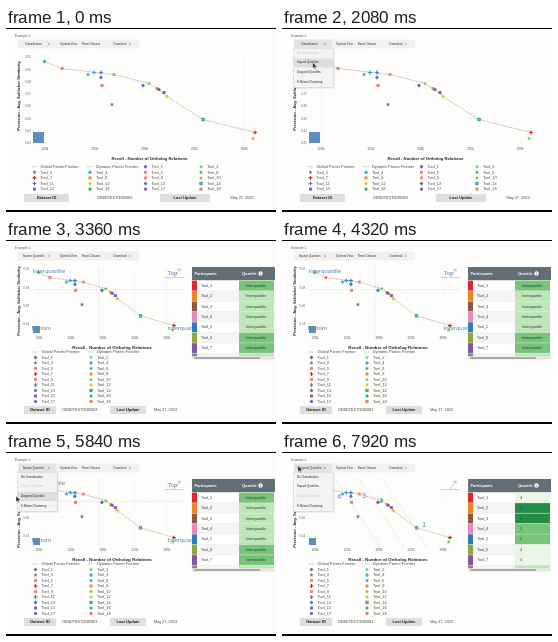
An HTML page that plays this animation: 270 by 184 pixels, repeating every 8 s.

```html
<!DOCTYPE html>
<html lang="en">
<head>
<meta charset="utf-8">
<title>Benchmark chart</title>
<style>
  html, body { margin: 0; width: 100%; height: 100%; overflow: hidden; background: #fdfdfb; }
  svg { display: block; width: 270px; height: 184px; }
  text { font-family: "Liberation Sans", Arial, sans-serif; white-space: pre; }
</style>
</head>
<body>
<svg id="stage" viewBox="0 0 270 184"></svg>
<script>
const stage = document.getElementById('stage');
const LOOP = 8000;
const MODES = ['Classification', 'Square Quartiles', 'Diagonal Quartiles'];
const ITEMS = ['No Classification', 'Square Quartiles', 'Diagonal Quartiles', 'K-Means Clustering'];

// x, y in the wide plot, shape, colour; one entry per tool
const TOOLS = [
  [137, 58, 'diamond', '#6a5acd'], [247, 111, 'star', '#6fce62'],
  [106, 77, 'star', '#84706a'], [88, 45, 'plus', '#2a9fd0'],
  [56, 41, 'square', '#ee7f86'], [82, 47, 'star', '#3aa6a0'],
  [249, 105, 'plus', '#d3222a'], [151, 61, 'square', '#f08a3c'],
  [108, 47, 'square', '#ef8a78'], [143, 56, 'star', '#67c95a'],
  [95, 45, 'plus', '#3f7fc4'], [161, 69, 'diamond', '#e8c520'],
  [95, 50, 'diamond', '#5a6fc0'], [197, 92, 'cross', '#279a83'],
  [158, 65, 'square', '#8e5bb5'], [38.5, 34, 'diamond', '#35b08a'],
  [153, 62, 'dot', '#6e57a8'], [96, 58, 'square', '#ee7a5c']
];
const FRONT = [[38.5, 34], [56, 41], [108, 47], [143, 56], [151, 61], [161, 69], [197, 92], [249, 105]];
const BARS = ['#e0252d', '#f08327', '#8a5a44', '#ee86bd', '#3579b8', '#91a63a', '#8455a5', '#858585'];
const GREENS = ['#248d47', '#76c578', '#bfe6b8', '#eaf6e6'];
const SQUARE_RANKS = [2, 3, 3, 3, 3, 2, 2, 3];
const DIAGONAL_RANKS = [4, 1, 1, 2, 2, 4, 4, 3];

const rect = (x, y, w, h, fill, more = '') =>
  `<rect x="${x}" y="${y}" width="${w}" height="${h}" fill="${fill}" ${more}/>`;
const text = (x, y, s, size = 3.8, fill = '#444', more = '') =>
  `<text x="${x}" y="${y}" font-size="${size}" fill="${fill}" ${more}>${s}</text>`;
const path = (d, stroke, width = .6, more = '') =>
  `<path d="${d}" fill="none" stroke="${stroke}" stroke-width="${width}" ${more}/>`;
const MID = 'text-anchor="middle"';
const BOLD = 'font-weight="700"';

function starPath() {
  let d = '';
  for (let i = 0; i < 10; i++) {
    const a = i * Math.PI / 5 - Math.PI / 2, r = i % 2 ? 1.1 : 2.6;
    d += `${i ? 'L' : 'M'}${(r * Math.cos(a)).toFixed(2)} ${(r * Math.sin(a)).toFixed(2)}`;
  }
  return d + 'z';
}

const SHAPES = {
  square: c => rect(-1.7, -1.7, 3.4, 3.4, c),
  dot: c => `<circle r="1.8" fill="${c}"/>`,
  diamond: c => `<path d="M0-2.4L2.2 0L0 2.4L-2.2 0z" fill="${c}"/>`,
  plus: c => path('M-2.2 0h4.4M0-2.2v4.4', c, 1.4),
  cross: c => rect(-1.9, -1.9, 3.8, 3.8, c) + path('M-1.2-1.2l2.4 2.4m0-2.4l-2.4 2.4', '#bfe5d8'),
  star: c => `<path d="${starPath()}" fill="${c}"/>`
};
const marker = (x, y, shape, color) =>
  `<g transform="translate(${x} ${y}) scale(.87)">${SHAPES[shape](color)}</g>`;

function toolbar(mode, open) {
  const label = (x, s) => text(x, 17.1, s, 2.9, '#333', MID);
  return text(9, 9, 'Example 1:', 3.2, '#555') +
    rect(12, 11.5, 121, 9, '#f1f1f0') + (open ? rect(12, 11.5, 38, 9, '#e4e4e3') : '') +
    label(27.5, MODES[mode]) + path('M42 14.6l1.4 1.4l-1.4 1.4', '#444', .5) +
    label(62.5, 'Optimal View') + label(85, 'Reset Classes') + label(114, 'Download') +
    path('M123 14.6l1.4 1.4l-1.4 1.4', '#444', .5);
}

function chart(mode, shown) {
  const wide = mode === 0;
  const px = x => wide ? x : .643 * x + 7.8;
  const py = y => wide ? y - .5 : .75 * y + 6.8;
  const left = px(27), right = px(263), top = py(27), bottom = py(117);
  let s = '';
  for (let i = 0; i < 5; i++) {
    const x = px(39 + 49.8 * i);
    s += path(`M${x} ${top}V${bottom}`, '#f5f5f3') +
      text(x, bottom + (wide ? 5 : 4.2), 100 + 50 * i + 'k', 3.2, '#555', MID);
  }
  const rows = wide ? 8 : 4, step = wide ? 12.3 : 24.6;
  for (let i = 0; i < rows; i++) {
    const y = py(29.5 + step * i);
    s += path(`M${left} ${y}H${right}`, '#f5f5f3') +
      text(left - 2, y + 1.2, (.5 - .04 * i / rows * 2).toFixed(2), 3.1, '#666', 'text-anchor="end"');
  }
  const logo = wide ? 11 : 7;
  s += text(0, 0, 'Precision - Avg. Schlicker Similarity', 4.1, '#222',
      `${BOLD} ${MID} transform="translate(14.2 ${wide ? 68 : 61}) rotate(-90)"`) +
    text(wide ? 143.5 : 106, wide ? 132 : 109, 'Recall - Number of Ortholog Relations', wide ? 4.2 : 4.4, '#222', `${BOLD} ${MID}`) +
    rect(27, bottom - logo - 1.5, logo, logo, '#5b8fbd');

  if (shown) {
    const line = 'M' + FRONT.map(([x, y]) => `${px(x)} ${py(y)}`).join('L');
    s += path(line, '#b5a294', .7, 'stroke-dasharray="2 .8"');
    for (const [x, y, shape, color] of TOOLS) s += marker(px(x), py(y), shape, color);
  }
  return s + classes(mode, shown);
}

function classes(mode, shown) {
  const dash = 'stroke-dasharray="1.2 1.2"';
  const blue = '#5f87b3';
  if (mode === 0) return '';
  const best = path('M168 37l6-8m-2.8 .6l2.8-.6l.2 2.8', '#8a98a5', .5) +
    text(178, 38.2, '(best performance)', 2.3, '#777', 'text-anchor="end"');
  if (mode === 1) {
    return path('M93 27.6V95M25 49.5H177', '#c0c0be', .5, dash) + best +
      text(26.5, 32.8, 'Interquartile', 6.2, blue) + text(161.5, 34.5, 'Top', 6.2, blue) +
      text(25.5, 90.3, 'Bottom', 6.2, blue) +
      `<svg width="186" height="184">${text(161.5, 90.3, 'Interquartile', 6.2, blue)}</svg>`;
  }
  if (!shown) return best;
  const cuts = [54, 78, 101].map(x => `M${x} 27.6L${x + 44} 95`).join('');
  const nums = [[140, 75], [97, 51], [80, 46], [55, 47]];
  return path(cuts, '#c0c0be', .5, dash) + best +
    nums.map(([x, y], i) => text(x, y, i + 1, 7.5, blue)).join('');
}

function legend(mode, shown) {
  const cols = mode ? 2 : 4;
  const first = mode ? 112 : 138.7;
  const step = mode ? 5.5 : 5.6;
  const names = ['Global Pareto Frontier', 'Dynamic Pareto Frontier', ...TOOLS.map((_, i) => 'Tool_' + (i + 1))];
  return names.map((name, i) => {
    const x = (mode ? 29.5 : 28.5) + 55.5 * (i % cols), y = first + Math.floor(i / cols) * step;
    const tool = TOOLS[i - 2];
    const key = !shown ? '' : tool ? marker(x, y, tool[2], tool[3])
      : path(`M${x - 3} ${y}h6`, i ? '#a9b99c' : '#b5a294', .7, 'stroke-dasharray="2 .8"');
    return key + text(x + 6, y + 1.3, name, 3.9, '#444');
  }).join('');
}

function footer(mode) {
  const [a, aw, id, b, bw, date] = mode ? [18, 32, 56, 104, 36, 148] : [18, 45, 91, 154, 50, 224.5];
  const head = (x, w, s) => rect(x, 166, w, 8, '#dededd') + text(x + w / 2, 171.4, s, 4, '#222', `${BOLD} ${MID}`);
  return head(a, aw, 'Dataset ID') + text(id, 171.4, 'OEBDTEST0000003', 3.8) +
    head(b, bw, 'Last Update') + text(date, 171.4, 'May 27, 2023', 3.8);
}

function table(mode) {
  if (mode === 0) return '';
  const ranks = mode === 1 ? SQUARE_RANKS : DIAGONAL_RANKS;
  let s = rect(186, 27, 83, 13.5, '#626d75') + text(188.5, 35, 'Participants', 3.9, '#fff', BOLD) +
    text(236, 35, 'Quartile', 3.9, '#fff', BOLD) +
    '<circle cx="254.5" cy="33.5" r="2.2" fill="#fff"/>' + text(254.5, 34.9, 'i', 3.8, '#626d75', `${BOLD} ${MID}`);
  BARS.forEach((bar, i) => {
    const y = 40.5 + 10.4 * i, h = Math.min(10.4, 116.5 - y);
    s += rect(186, y, 83, h, i % 2 ? '#f5f5f4' : '#fff') + rect(186, y, 5, h, bar) +
      rect(233, y, 35, h, GREENS[ranks[i] - 1]) + path(`M186 ${y}h82`, '#dfe3df', .4);
    if (h > 6) s += text(195, y + 6.2, 'Tool_' + (i + 1), 3.8, '#333') +
      text(mode === 1 ? 250 : 239, y + 6.2, mode === 1 ? 'Interquartile' : ranks[i], 3.8, '#334', MID);
  });
  return s + rect(186, 116.5, 83, 3, '#e6e6e5') + rect(188, 117, 66, 2, '#aaa', 'rx="1"');
}

function menu(mode, hover) {
  let s = rect(12.5, 21, 39.8, 39.5, '#000', 'opacity=".14"') +
    rect(11.5, 20.5, 39.8, 39, '#f4f4f3', 'stroke="#d4d4d2" stroke-width=".5"');
  ITEMS.forEach((item, i) => {
    const y = 24.8 + 9.6 * i;
    if (i === hover) s += rect(11.8, y - 4, 39.2, 9, '#dededd');
    s += text(15, y + 1, item, 2.9, i === mode ? '#c2c2c0' : '#222');
  });
  return s;
}

function cursor(x, y, blocked) {
  if (blocked) return `<circle cx="${x}" cy="${y}" r="2" fill="#fff" stroke="#cf2b2b" stroke-width="1"/>` +
    path(`M${x - 1.4} ${y - 1.4}l2.8 2.8`, '#cf2b2b', .9);
  return `<path d="M${x} ${y}v6l1.5-1.3l1 2.1l.9-.4l-1-2.1h1.9z" fill="#222" stroke="#fff" stroke-width=".4"/>`;
}

// Pointer stops: time, x, y
const MOVES = [[1000, 44, 17], [1520, 39, 18], [2200, 30, 36], [2700, 30, 36],
  [4500, 46, 15], [5040, 44, 15], [5700, 10, 44], [7200, 12, 44], [7480, 20, 44], [7920, 16, 14], [8000, 16, 14]];

function pointer(t) {
  if (t < 1000 || (t > 2700 && t < 4500)) return null;
  const i = MOVES.findIndex(m => m[0] >= t);
  const b = MOVES[i], a = MOVES[Math.max(0, i - 1)];
  const k = b === a ? 0 : (t - a[0]) / (b[0] - a[0]);
  const e = k * k * (3 - 2 * k);
  return [a[1] + (b[1] - a[1]) * e, a[2] + (b[2] - a[2]) * e];
}

function draw(t) {
  const mode = t < 2240 ? 0 : t < 7280 ? 1 : 2;
  const shown = !(t >= 2240 && t < 2720) && !(t >= 7280 && t < 7600);
  const open = (t >= 1200 && t < 2720) || t >= 4640;
  const p = pointer(t);
  const row = p && p[1] > 21 ? Math.floor((p[1] - 20.7) / 9.6) : -1;
  stage.innerHTML = rect(0, 0, 270, 184, '#fdfdfb') + rect(0, 0, 270, 1, '#000') +
    rect(0, 182, 270, 2, '#000') +
    chart(mode, shown) + legend(mode, shown) + footer(mode) + table(mode) + toolbar(mode, open) +
    (open ? menu(mode, row) : '') + (p ? cursor(p[0], p[1], row === mode && mode > 0) : '');
}

let start, last = -1;
function tick(now) {
  start ??= now;
  const t = Math.floor((now - start) % LOOP / 80) * 80;
  if (t !== last) draw(last = t);
  requestAnimationFrame(tick);
}
draw(0);
requestAnimationFrame(tick);
</script>
</body>
</html>
```
